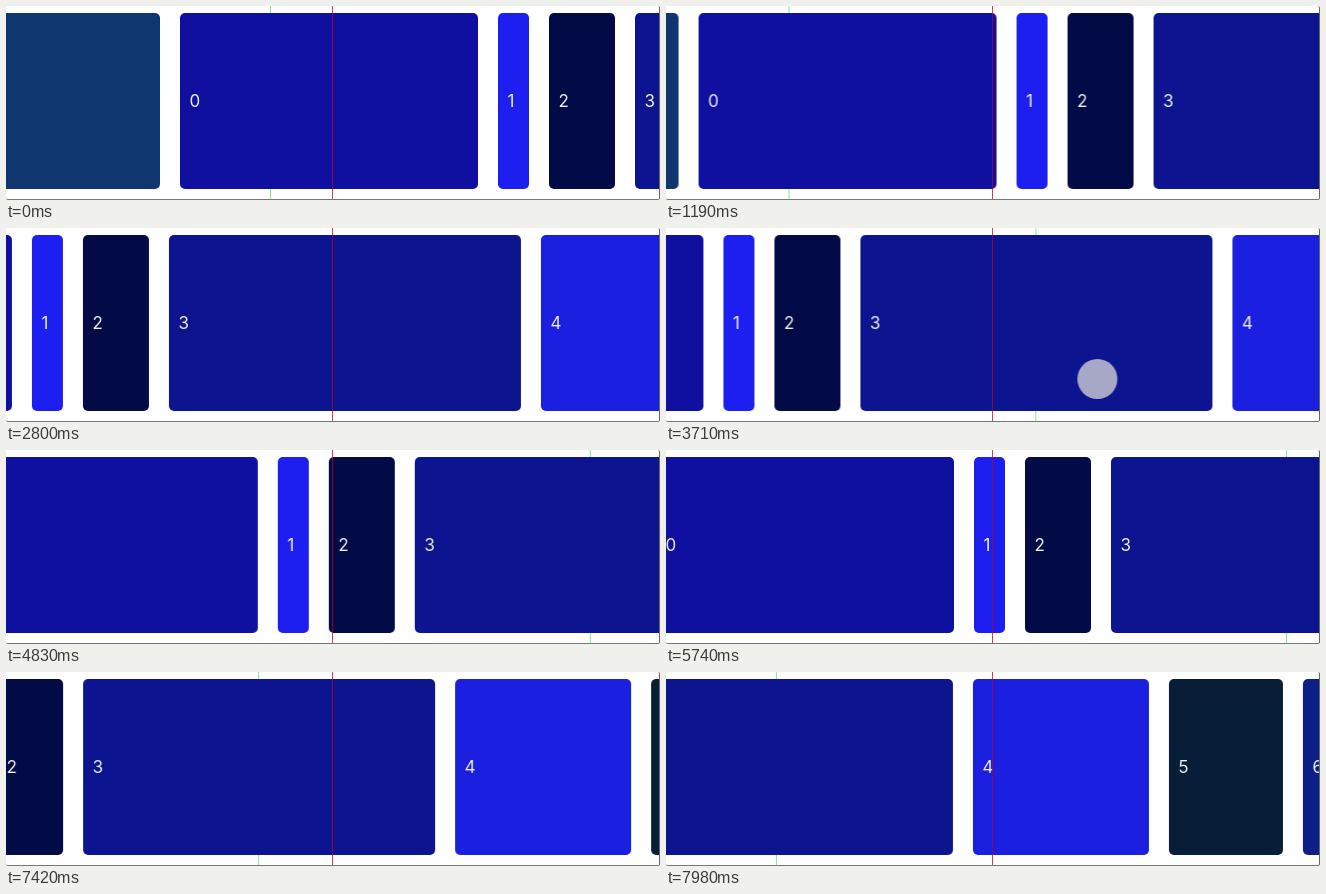
These frames come from a looping animation (654x194 px, 8 s). An HTML page:

```html
<!DOCTYPE html>
<html lang="en">
<head>
<meta charset="utf-8">
<title>Snapping carousel</title>
<style>
  html, body { margin: 0; width: 100%; height: 100%; overflow: hidden; background: #fff; }
  #stage { position: relative; width: 654px; height: 194px; overflow: hidden; background: #fff; }
  #track, .line, #touch { position: absolute; top: 0; left: 0; will-change: transform; }
  .card {
    position: absolute; top: 6.5px; height: 176.5px; border-radius: 5px;
    box-sizing: border-box; padding-left: 9.5px;
    color: #f2f2f6; font: 17px/177px Inter, Roboto, sans-serif;
  }
  .line { width: 1.2px; height: 194px; }
  #anchor { background: #7fe98a; }
  #center { left: 325.5px; background: rgba(190, 0, 30, .75); }
  #touch { width: 40px; height: 40px; border-radius: 50%; background: rgba(205, 206, 210, .8); }
  #border {
    position: absolute; inset: 0; box-sizing: border-box; border-radius: 2px;
    border-bottom: 1px solid #777; border-right: 1px solid #666;
  }
</style>
</head>
<body>
<div id="stage">
  <div id="anchor" class="line"></div>
  <div id="track"></div>
  <div id="center" class="line"></div>
  <div id="touch"></div>
  <div id="border"></div>
</div>
<script>
const LOOP = 8000, TAU = 500, GAP = 20;
const byId = id => document.getElementById(id);
const track = byId('track'), anchor = byId('anchor'), touch = byId('touch');

const cards = [
  ['', 320, '#10366f'],
  [0, 298, '#0f10a0'],
  [1, 31, '#1c1ff0'],
  [2, 66, '#020b45'],
  [3, 352, '#0d1490'],
  [4, 176, '#1b20e0'],
  [5, 114, '#071d38'],
  [6, 200, '#0c1f86'],
];
let left = -340;
for (const [label, width, color] of cards) {
  const card = document.createElement('div');
  card.className = 'card';
  card.textContent = label;
  Object.assign(card.style, { left: left + 'px', width: width + 'px', background: color });
  track.append(card);
  left += width + GAP;
}

// Drag keys: time, scroll position, velocity; a fourth value is where a free glide comes to rest.
const keys = [
  [0, 174, 0],
  [700, 174, 0],
  [940, 168, -.05],
  [1100, 100, -.81, -305.6],
  [3220, -299.8, 0],
  [3500, -300, 0],
  [3710, -261, .38],
  [3990, -152, .25],
  [4130, -135, 0],
  [4290, -135, 0],
  [4400, -105.3, .2, -3],
  [5880, -8.3, 0],
  [6560, -8.3, 0],
  [6790, -132.5, 0],
  [7000, -132.5, 0],
  [7070, -163, -.85, -589],
];

// Finger contacts: start, end, offset from the scroll position, height.
const touches = [
  [700, 1100, 256, 140],
  [3220, 4400, 692, 151],
  [6560, 7070, 508.5, 124],
];

function scrollAt(t) {
  let i = keys.length - 1;
  while (keys[i][0] > t) i--;
  const [t0, x0, v0, rest] = keys[i];
  if (rest !== undefined) return rest + (x0 - rest) * Math.exp((t0 - t) / TAU);
  const [t1, x1, v1] = keys[i + 1];
  const d = t1 - t0, u = (t - t0) / d, w = 1 - u;
  return w * w * ((1 + 2 * u) * x0 + u * d * v0) + u * u * ((3 - 2 * u) * x1 - w * d * v1);
}

const move = (el, x, y = 0) => { el.style.transform = `translate(${x}px, ${y}px)`; };

function draw(now) {
  const t = now % LOOP;
  const x = scrollAt(t);
  move(track, x);
  move(anchor, x + (t < 3200 ? 90 : 630));
  const contact = touches.find(([from, to]) => t >= from && t < to);
  touch.style.visibility = contact ? 'visible' : 'hidden';
  if (contact) move(touch, x + contact[2] - 20, contact[3] - 20);
}

const start = performance.now();
function tick() {
  draw(performance.now() - start);
  requestAnimationFrame(tick);
}
tick();
</script>
</body>
</html>
```
